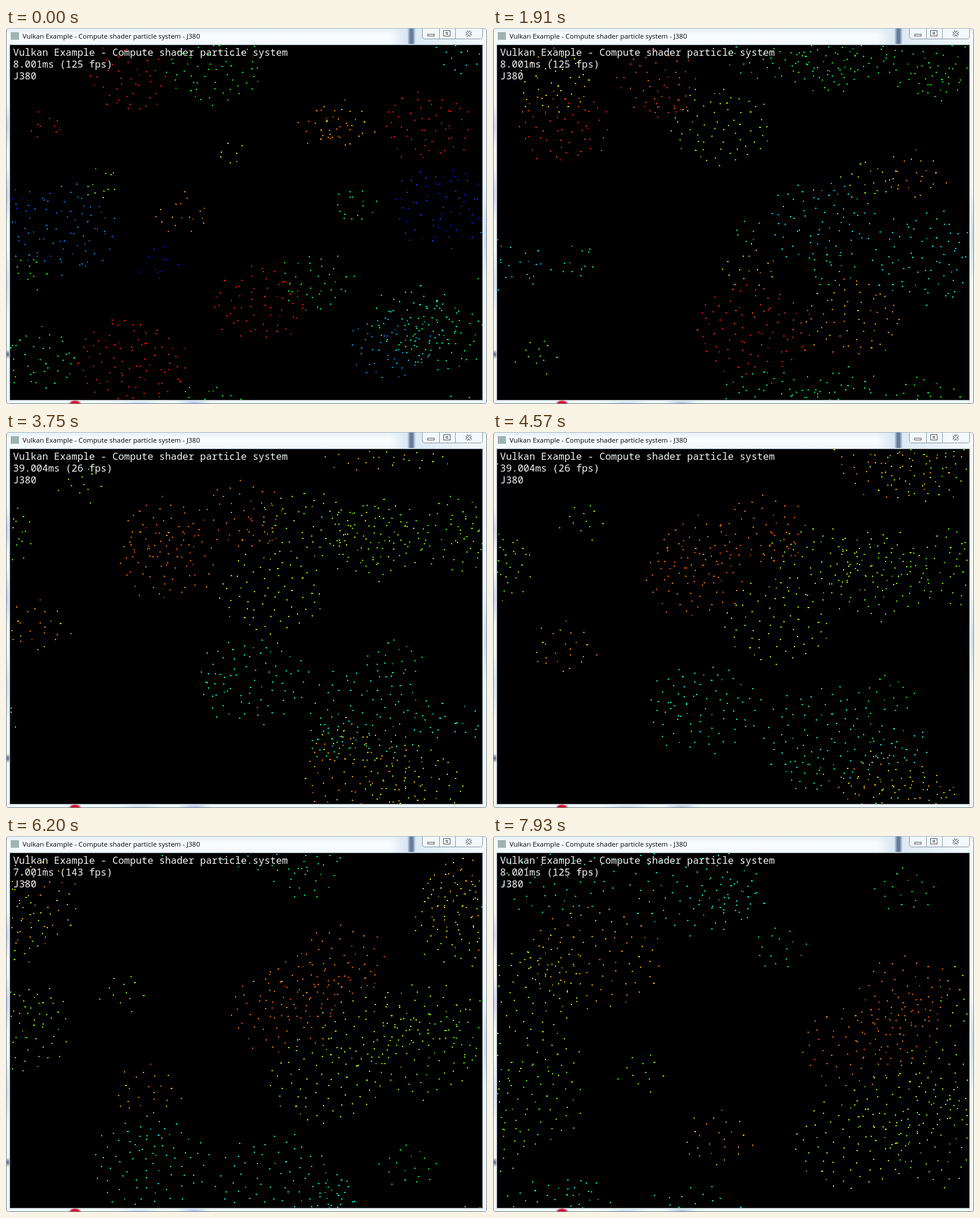
Animation, 815 px wide and 636 px high, one loop 8 s. Source, as an HTML page with a canvas:

```html
<!DOCTYPE html>
<html lang="en">
<head>
<meta charset="utf-8">
<title>Compute shader particle system</title>
<style>
  html, body { margin: 0; width: 100%; height: 100%; overflow: hidden; }
  #win {
    position: relative; width: 815px; height: 636px; overflow: hidden; box-sizing: border-box;
    background:
      radial-gradient(ellipse 11px 6px at 116px 634px, #d3122b 55%, transparent),
      radial-gradient(ellipse 40px 5px at 225px 634px, #c3d6ee, transparent),
      radial-gradient(ellipse 30px 5px at 318px 633px, #b3c4e2, transparent),
      radial-gradient(ellipse 5px 8px at 2px 551px, #4c5d7c, transparent),
      radial-gradient(ellipse 5px 40px at 1px 165px, #c9cdec, transparent),
      radial-gradient(ellipse 5px 50px at 1px 280px, #c3cbed, transparent),
      radial-gradient(ellipse 5px 60px at 1px 430px, #cfdcf2, transparent),
      radial-gradient(ellipse 5px 90px at 812px 350px, #c4d9ed, transparent),
      linear-gradient(90deg, transparent 679px, #667b99 684px, #667b99 688px, transparent 693px) 0 0 / 100% 26px no-repeat,
      linear-gradient(90deg, transparent 650px, #d9e8f4 676px, #e0eef7 720px, transparent) 0 0 / 100% 28px no-repeat,
      linear-gradient(#e6f0f7, #fafdfe 12px, #f0f8fc 28px, #eef7fb);
    border: 1px solid #76828c; border-top-color: #a9b6c0; border-radius: 5px;
  }
  #win > * { position: absolute; }
  #icon { left: 7px; top: 6px; width: 14px; height: 13px; background: #9fb4b2; }
  #title { left: 27px; top: 4px; font: 11.5px/18px "Open Sans", "Noto Sans", sans-serif; color: #000; white-space: nowrap; }
  #buttons { left: 704px; top: -1px; }
  canvas { left: 6px; top: 28px; outline: 1px solid #98a5ad; }
  #info {
    left: 11px; top: 30px; margin: 0; color: #f4f4f4;
    font: 16.5px/20px "Noto Sans Mono", "DejaVu Sans Mono", monospace; white-space: pre;
  }
</style>
</head>
<body>
<div id="win">
  <div id="icon"></div>
  <div id="title">Vulkan Example - Compute shader particle system - J380</div>
  <svg id="buttons" width="104" height="20" fill="none" stroke="#8b98a5">
    <path d="M.5 0V14Q.5 18.500 5 18.500H98Q102.500 18.500 102.500 14V0M29.500 0V18M56.500 0V18" fill="#f3f8fb"/>
    <g stroke="#4b535e" fill="#fff">
      <rect x="9.500" y="10.500" width="11" height="3"/>
      <rect x="36.500" y="4.500" width="11" height="9"/>
      <rect x="40.500" y="7.500" width="3" height="3"/>
      <path d="M75 5.500l8 8m0-8l-8 8" stroke-width="4"/>
      <path d="M75 5.500l8 8m0-8l-8 8" stroke="#fff" stroke-width="2"/>
    </g>
  </svg>
  <canvas width="800" height="600"></canvas>
  <pre id="info"></pre>
</div>
<script>
const W = 800, H = 600, LEFT = 7, TOP = 29;
const LOOP = 8000, STEP = 139.1;   // ms
const MID = 2.91, END = 7.93;      // s
const ctx = document.querySelector('canvas').getContext('2d');
const info = document.getElementById('info');
const flocks = [];

let seed = 7;
const random = () => (seed = seed * 16807 % 2147483647) / 2147483647;

// Position and speed: steering evenly until MID, then straight on to the end
function axis(from, mid, to) {
  const v = (to - mid) / (END - MID);
  const bend = (from - mid + v * MID) / MID ** 2;
  return t => {
    const s = t - MID, c = s < 0 ? bend : 0;
    return [mid + v * s + c * s * s, v + 2 * c * s];
  };
}

// Places are unwrapped: they may run past the edges of the view
function flock(n, [x0, y0], [x1, y1], [x2, y2]) {
  const dots = Array.from({ length: n }, (_, i) => {
    const r = Math.sqrt(i + .5), a = i * 2.39996;
    return {
      x: r * Math.cos(a) * 1.15, y: r * Math.sin(a) * .9,
      jx: random() - .5, jy: random() - .5,
      tint: random() * 20 - 10, glow: random()
    };
  });
  flocks.push({ x: axis(x0, x1, x2), y: axis(y0, y1, y2), dots });
}

// Bound for the right
flock(56, [710, 165], [1000, 190], [1410, 360]);
flock(24, [570, 165], [785, 293], [1178, 513]);
flock(85, [210, 565], [530, 540], [970, 805]);
flock(42, [210, 90], [340, 115], [700, 265]);
flock(10, [67, 162], [370, 145], [720, 290]);
flock(18, [300, 315], [510, 465], [900, 810]);
flock(38, [60, 560], [180, 735], [680, 930]);

// Bound for the bottom
flock(60, [430, 465], [660, 540], [850, 870]);
flock(12, [35, 410], [100, 622], [250, 997]);
flock(54, [740, 520], [745, 715], [865, 1050]);
flock(14, [765, 45], [770, 130], [900, 370]);
flock(48, [650, 540], [470, 695], [690, 1060]);
flock(36, [525, 430], [590, 725], [770, 1000]);
flock(58, [690, 500], [600, 715], [760, 1120]);
flock(64, [350, 65], [415, 220], [605, 520]);
flock(18, [540, 165], [655, 320], [700, 690]);
flock(16, [590, 300], [560, 470], [485, 790]);

// Bound for the left
flock(80, [95, 340], [-130, 430], [-460, 680]);
flock(70, [740, 300], [480, 370], [110, 655]);
flock(12, [160, 265], [70, 448], [-420, 700]);
flock(12, [255, 395], [-15, 442], [-380, 705]);
flock(7, [380, 212], [400, 390], [150, 600]);

// Right is red, down is green, left is blue
function headingHue(vx, vy) {
  let a = Math.atan2(vy, vx) * 180 / Math.PI;
  if (a < -90) a += 360;
  a = Math.max(0, a);
  return a < 90 ? a + a * a / 160 : 140 + (a - 90) ** 2 / 100;
}

const wrap = (v, size) => ((Math.round(v) % size) + size) % size;

function drawDots(t) {
  ctx.fillStyle = '#000';
  ctx.fillRect(0, 0, W, H);
  const spread = 9 + t / 4, jitter = 16 - t;
  for (const f of flocks) {
    const [cx, vx] = f.x(t), [cy, vy] = f.y(t);
    const hue = headingHue(vx, vy);
    for (const p of f.dots) {
      const x = wrap(cx - LEFT + p.x * spread + p.jx * jitter, W);
      const y = wrap(cy - TOP + p.y * spread + p.jy * jitter, H);
      ctx.fillStyle = `hsl(${Math.max(4, hue + p.tint)} 100% ${p.glow < .1 ? 32 : 50}%)`;
      ctx.fillRect(x, y, p.glow > .94 ? 3 : 2, 2);
    }
  }
}

// The frame time is read about once a second
const readings = [8, 31, 8, 7, 39, 7, 7, 8, 8];

function drawInfo(t) {
  const ms = readings[Math.floor(t + .4)];
  info.textContent = 'Vulkan Example - Compute shader particle system\n' +
    `${(ms * 1.0001).toFixed(3)}ms (${Math.round(1000 / ms)} fps)\nJ380`;
}

const start = performance.now();
let shown = -1;
function frame() {
  const now = (performance.now() - start) % LOOP;
  const step = Math.floor(now / STEP + .3);
  if (step !== shown) {
    shown = step;
    const t = step * STEP / 1000;
    drawDots(t);
    drawInfo(t);
  }
  requestAnimationFrame(frame);
}
frame();
</script>
</body>
</html>
```
